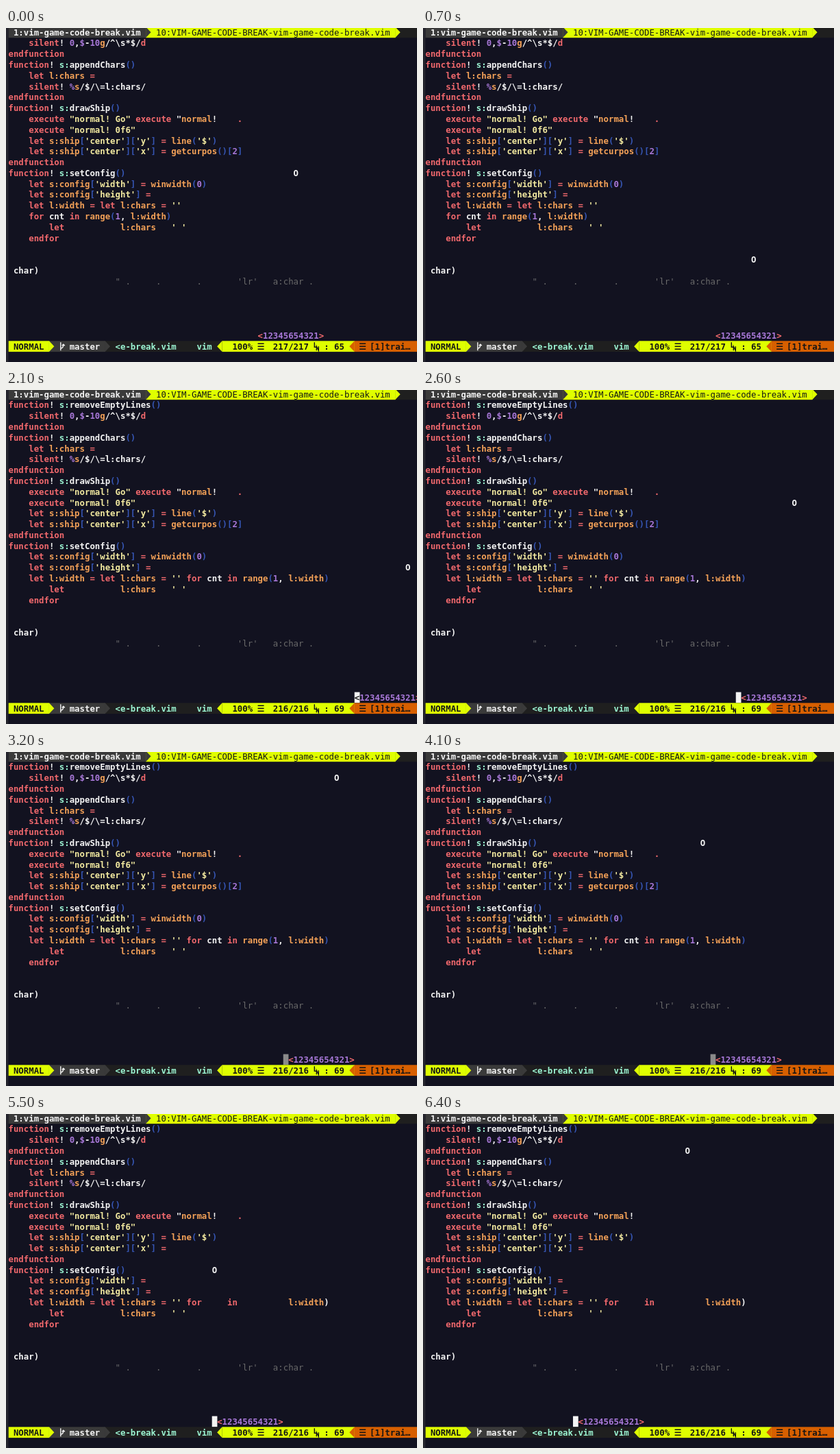
An HTML page with a canvas for the animation above (6.5 s loop, 600 by 487 pixels).

```html
<!DOCTYPE html>
<html lang="en">
<head>
<meta charset="utf-8">
<title>Code break</title>
<style>
  html, body { margin: 0; width: 100%; height: 100%; overflow: hidden; background: #121220; }
  canvas { display: block; width: 600px; height: 487px; }
</style>
</head>
<body>
<canvas id="stage"></canvas>
<script>
const LOOP = 6500, TICK = 100;
const LEFT = 3.5, COL = 7.43, MID = 6.3, ROW = 15.79;
const FONT = '12.34px "DejaVu Sans Mono", monospace';
const C = {
  bg: '#121220', edge: '#25252d', white: '#f4f4f4', red: '#f2696d', orange: '#f5a258',
  yellow: '#f3eaa0', purple: '#a878d8', blue: '#3656b4', mint: '#9cf5d3', grey: '#6a6a6a',
  lime: '#dfff00', ink: '#141414', tab: '#3a3a3a', bar: '#1f1f1f', rust: '#d75f00'
};

const canvas = document.getElementById('stage');
const ctx = canvas.getContext('2d');
const ratio = window.devicePixelRatio || 1;
canvas.width = 600 * ratio;
canvas.height = 487 * ratio;
ctx.scale(ratio, ratio);

const colX = c => LEFT + c * COL;
const rowTop = r => MID + r * ROW - ROW / 2;

function put(col, row, text, color, weight = 'bold') {
  ctx.font = `${weight} ${FONT}`;
  ctx.fillStyle = color;
  [...text].forEach((ch, i) => {
    if (ch !== ' ') ctx.fillText(ch, colX(col + i), MID + row * ROW + 4.3);
  });
}

function block(from, to, row, color) {
  ctx.fillStyle = color;
  ctx.fillRect(colX(from), rowTop(row), (to - from) * COL + 0.3, ROW);
}

// Powerline separator; dir 1 points right, -1 points left
function arrow(col, row, color, dir = 1) {
  const base = colX(dir > 0 ? col : col + 1);
  const y = rowTop(row);
  ctx.fillStyle = color;
  ctx.beginPath();
  ctx.moveTo(base, y);
  ctx.lineTo(base + dir * COL, y + ROW / 2);
  ctx.lineTo(base, y + ROW);
  ctx.fill();
}

function icon(col, row, path, color, width = 1.4) {
  ctx.save();
  ctx.translate(colX(col), MID + row * ROW);
  ctx.strokeStyle = color;
  ctx.lineWidth = width;
  ctx.stroke(new Path2D(path));
  ctx.restore();
}

const RULES = [
  [/"[^"]*"|'[^']*'/, C.yellow],
  [/s:(?=\w+\(\))/, C.mint],
  [/(?<=s:)\w+(?=\(\))/, C.white],
  [/(?<!\\=)\b[ls]:\w+|\w+(?=\()|normal|(?<=%)s|(?<=\d)g/, C.orange],
  [/\b(?:(?:end)?(?:function|for)|let|in|execute|silent)\b|(?<!\\)=|(?<=\/)d$|\.$/, C.red],
  [/\d+|%|(?<=,)\$/, C.purple],
  [/[[\]()]/, C.blue]
];
const LEXER = new RegExp(RULES.map(([re]) => `(${re.source})`).join('|'), 'g');

function codeLine(row, line) {
  put(0, row, line.replace(LEXER, m => ' '.repeat(m.length)), C.white);
  for (const m of line.matchAll(LEXER)) {
    const rule = m.slice(1).findIndex(g => g !== undefined);
    const unmatched = m[0] === ')' && !line.includes('(');
    put(m.index, row, m[0], unmatched ? C.white : RULES[rule][1]);
  }
}

// Source text after the ball has made a given number of steps
function source(step) {
  const until = (limit, text) => step < limit ? text : ' '.repeat(text.length);
  const loop = `for ${until(64, 'cnt')} in ${until(58, 'range(1,')} l:width)`;
  const width = "    let l:width = let l:chars = ''";
  return [
    'function! s:removeEmptyLines()',
    '    silent! 0,$-10g/^\\s*$/d',
    'endfunction',
    'function! s:appendChars()',
    '    let l:chars =',
    '    silent! %s/$/\\=l:chars/',
    'endfunction',
    'function! s:drawShip()',
    '    execute "normal! Go" execute "normal!' + until(70, '    .'),
    '    execute "normal! 0f6"',
    "    let s:ship['center']['y'] = line('$')",
    "    let s:ship['center']['x'] = " + until(61, 'getcurpos()[2]'),
    'endfunction',
    'function! s:setConfig()',
    "    let s:config['width'] = " + until(65, 'winwidth(0)'),
    "    let s:config['height'] =",
    ...(step < 24 ? [width, '    ' + loop] : [width + ' ' + loop]),
    "        let           l:chars   ' '",
    '    endfor'
  ];
}

// Piecewise linear value through [key, value] points
function along(points, key) {
  let i = 1;
  while (i < points.length - 1 && key > points[i][0]) i++;
  const [k0, v0] = points[i - 1], [k1, v1] = points[i];
  const f = Math.min(1, (key - k0) / (k1 - k0));
  return Math.round(v0 + (v1 - v0) * f);
}

const STEPS = [[0, 0], [1400, 16], [2100, 25], [3200, 39], [4100, 49], [5500, 65], [6400, 76]];
const SHIP = [[0, 49], [1400, 65], [2100, 68], [3200, 55], [4100, 57], [5500, 41], [6400, 30]];
// step, column, row at every bounce
const BOUNCES = [
  [0, 56, 13], [14, 70, 27], [23, 79, 18], [24, 79, 17], [25, 78, 16], [41, 62, 0],
  [57, 46, 16], [60, 43, 13], [63, 40, 16], [64, 39, 15], [76, 51, 3]
];
const BALL_X = BOUNCES.map(([s, x]) => [s, x]);
const BALL_Y = BOUNCES.map(([s, , y]) => [s, y]);

function tabLine() {
  block(0, 81, 0, C.bar);
  block(0, 27, 0, C.tab);
  block(27, 76, 0, C.lime);
  arrow(27, 0, C.tab);
  arrow(76, 0, C.lime);
  put(1, 0, '1:vim-game-code-break.vim', C.white);
  put(29, 0, '10:VIM-GAME-CODE-BREAK-vim-game-code-break.vim', C.ink, 'normal');
}

function statusLine(t, step) {
  const row = 29;
  const lines = step < 24 ? 217 : 216;
  const column = t < 1300 ? 65 : t < 2000 ? 66 : 69;
  const bars = 'M0-4H9M0 0H9M0 4H9';
  block(0, 81, row, C.bar);
  block(0, 8, row, C.lime);
  block(8, 19, row, C.tab);
  block(42, 68, row, C.lime);
  block(68, 81, row, C.rust);
  arrow(8, row, C.lime);
  arrow(19, row, C.tab);
  arrow(41, row, C.lime, -1);
  arrow(67, row, C.rust, -1);
  put(1, row, 'NORMAL', C.ink);
  icon(10, row, 'M2-6V6M2 3Q6 2 6-2M4-1L6-3L8-1', C.white);
  put(12, row, 'master', C.white);
  put(21, row, '<e-break.vim    vim', C.mint);
  put(44, row, '100%', C.ink);
  icon(49, row, bars, C.ink);
  put(52, row, `${lines}/${lines}`, C.ink);
  icon(60, row, 'M1-6V1H4M4 6V0L7 6V0', C.ink);
  put(62, row, `: ${column}`, C.ink);
  icon(69, row, bars, C.ink);
  put(71, row, '[1]trai…', C.ink);
}

function ship(t) {
  const row = 28, x = along(SHIP, t);
  const covered = t >= 1700 && t < 2300;
  if (t >= 1700) {
    const cell = covered ? x : x - 1;
    block(cell, cell + 1, row, t >= 2900 && t < 4600 ? '#8a8a8a' : C.white);
  }
  put(x, row, '<', covered ? C.ink : C.red);
  put(x + 1, row, '12345654321', C.purple);
  put(x + 12, row, '>', C.red);
}

function draw(t) {
  const step = along(STEPS, t);
  ctx.fillStyle = C.bg;
  ctx.fillRect(0, 0, 600, 487);
  const code = source(step);
  code.forEach((line, i) => {
    const row = 20 - code.length + i;
    if (row > 0) codeLine(row, line);
  });
  put(1, 22, 'char)', C.white);
  put(21, 23, "\" .     .       .       'lr'   a:char .", C.grey, 'normal');
  ship(t);
  put(along(BALL_X, step), along(BALL_Y, step), 'O', C.white);
  tabLine();
  statusLine(t, step);
  ctx.fillStyle = C.edge;
  ctx.fillRect(0, 0, LEFT, 487);
}

const start = performance.now();
function frame() {
  const t = (performance.now() - start) % LOOP;
  draw(Math.floor(t / TICK) * TICK);
  requestAnimationFrame(frame);
}
frame();
</script>
</body>
</html>
```
